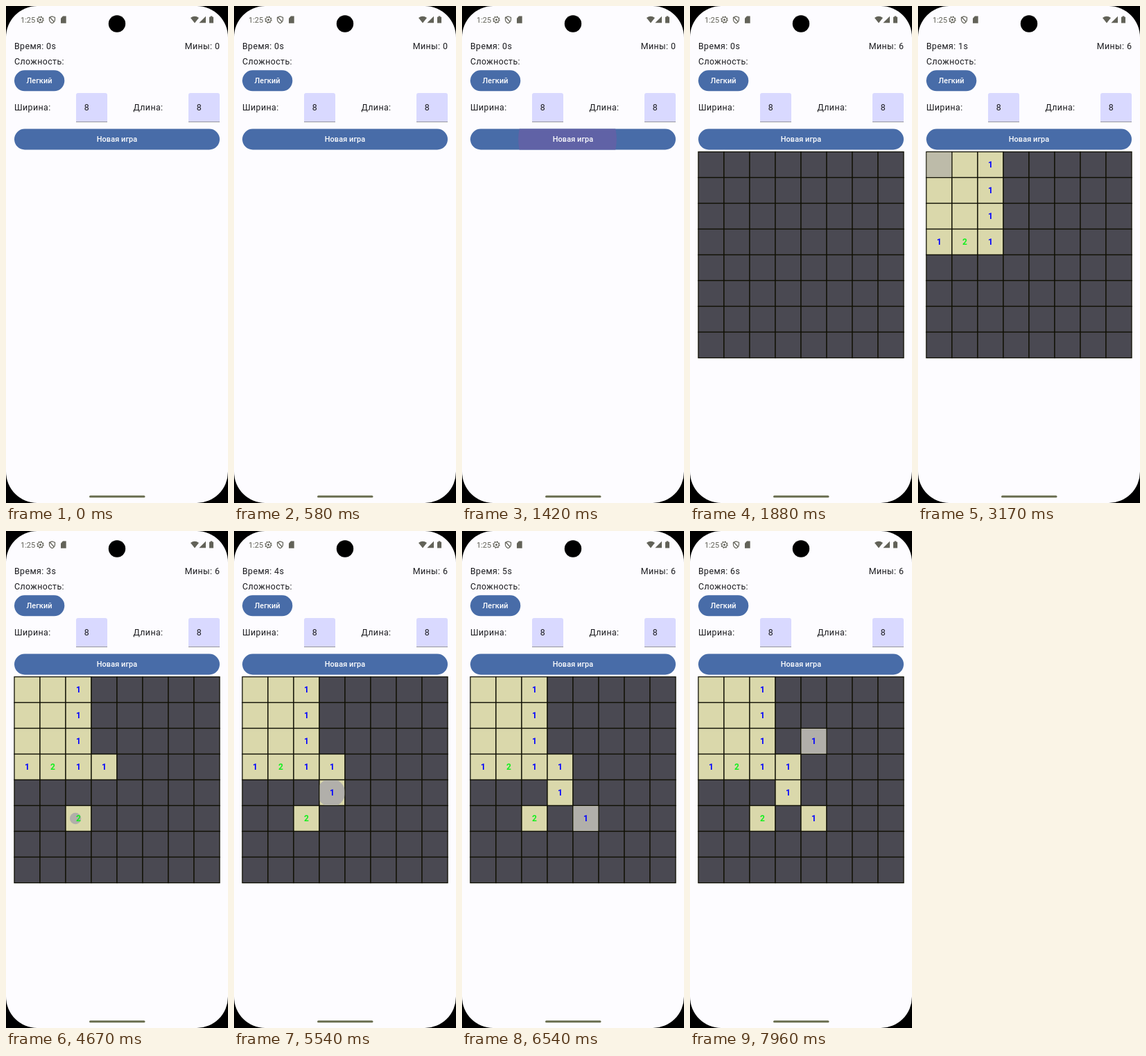
An HTML page for the animation above (8 s loop, 320 by 714 pixels).

```html
<!DOCTYPE html>
<html lang="ru">
<head>
<meta charset="utf-8">
<title>Игра</title>
<style>
  html, body { margin: 0; width: 100%; height: 100%; overflow: hidden; background: #000; }
  svg { display: block; width: 100%; height: 100%; font-family: Roboto, sans-serif; }
  .body { font-size: 12.4px; letter-spacing: .39px; fill: #1b1b1f; }
  .button { fill: #486ca8; }
  .label { font-size: 10.9px; font-weight: 500; letter-spacing: .08px; fill: #fff; text-anchor: middle; }
  .number { font-size: 12px; font-weight: 700; text-anchor: middle; }
  .status { fill: #626258; }
  .line { fill: none; stroke: #626258; stroke-width: 1.2; }
</style>
</head>
<body>
<svg viewBox="0 0 320 714">
  <defs>
    <clipPath id="buttonClip"><rect x="12" y="176.5" width="296" height="30" rx="15"/></clipPath>
    <clipPath id="cellClip"><rect id="cellClipRect" width="35.7" height="35.7"/></clipPath>
  </defs>
  <rect width="320" height="714" rx="45" fill="#fdfcff"/>
  <circle cx="160" cy="25.5" r="12.2"/>

  <text class="status" x="21" y="23.5" font-size="11">1:25</text>
  <circle class="line" cx="49.5" cy="19.7" r="3.7"/>
  <circle class="line" cx="49.5" cy="19.7" r="4.6" stroke-dasharray="1.8 1.81"/>
  <circle class="status" cx="49.5" cy="19.7" r="1.5"/>
  <path class="line" d="M66.5 15l4 1.5v3c0 2.400-1.700 4.200-4 5.200-2.300-1-4-2.800-4-5.200v-3zM63.500 16.500l6 6.500"/>
  <path class="status" d="M82 14.500h4.700v10.200H79v-7z"/>
  <path class="status" d="M266 17q6-4.500 12 0l-6 7.500zM288 14.700v9.600h-9.600zM293 15.700h1.600v-1.200h2.800v1.200H299v8.800h-6z"/>

  <text class="body" x="12" y="62.300" id="clock">Время: 0s</text>
  <text class="body" x="308.300" y="62.300" text-anchor="end" id="mines">Мины: 0</text>
  <text class="body" x="12" y="84.300">Сложность:</text>
  <rect class="button" x="12" y="92.300" width="72.300" height="30" rx="15"/>
  <text class="label" x="48" y="111.200">Легкий</text>

  <text class="body" x="12" y="150.300">Ширина:</text>
  <text class="body" x="183.500" y="150.300">Длина:</text>
  <g id="fields"></g>

  <rect class="button" x="12" y="176.500" width="296" height="30" rx="15"/>
  <g clip-path="url(#buttonClip)"><circle id="buttonRipple" cx="152" cy="191.500" fill="#6062a6"/></g>
  <text class="label" x="160" y="195.300">Новая игра</text>

  <g id="board"></g>
  <rect x="120" y="703.300" width="80.500" height="3" rx="1.500" fill="#6a6e50"/>
</svg>
<script>
const LOOP = 8000, SIZE = 37, LEFT = 12, TOP = 209.5;
const START = 1460, HOLD = 500, FADE = 300;
const TAPS = [
  { at: 2580, col: 0, row: 0 },
  { at: 3620, col: 3, row: 3, value: 1 },
  { at: 4620, col: 2, row: 5, value: 2 },
  { at: 5360, col: 3, row: 4, value: 1 },
  { at: 6100, col: 4, row: 5, value: 1 },
  { at: 7540, col: 4, row: 2, value: 1 }
];
const OPENING = ['  1', '  1', '  1', '121'];

const $ = id => document.getElementById(id);
const clamp = v => Math.min(1, Math.max(0, v));

function add(parent, tag, attrs, text = '') {
  const node = document.createElementNS('http://www.w3.org/2000/svg', tag);
  for (const key in attrs) node.setAttribute(key, attrs[key]);
  node.textContent = text;
  return parent.appendChild(node);
}

for (const x of [101, 263]) {
  add($('fields'), 'path', { d: `M${x} 167v-39q0-3 3-3h39q3 0 3 3v39z`, fill: '#d9d9ff' });
  add($('fields'), 'rect', { x, y: 166, width: 45, height: 1, fill: '#98989c' });
  add($('fields'), 'text', { class: 'body', x: x + 11.7, y: 150.3 }, '8');
}

const board = $('board');
const tiles = [];
for (let i = 0; i < 64; i++) {
  const col = i % 8, row = i >> 3;
  const tap = TAPS.find(p => p.col === col && p.row === row);
  const opened = row < 4 && col < 3;
  tiles.push({
    openAt: opened ? TAPS[0].at : tap ? tap.at : Infinity,
    value: opened ? OPENING[row][col].trim() : tap && tap.value,
    x: LEFT + col * SIZE,
    y: TOP + row * SIZE
  });
}
for (const tile of tiles) {
  tile.rect = add(board, 'rect', { x: tile.x, y: tile.y, width: SIZE, height: SIZE, stroke: '#101004', 'stroke-width': 1.3 });
}
const ripple = add(add(board, 'g', { 'clip-path': 'url(#cellClip)' }), 'circle', { fill: '#b1afaa' });
for (const tile of tiles) {
  if (!tile.value) continue;
  tile.label = add(board, 'text', {
    class: 'number', x: tile.x + SIZE / 2, y: tile.y + 22.7,
    fill: tile.value == 1 ? '#0000ff' : '#14f01e'
  }, tile.value);
}

function drawRipple(node, age, enter, hold, fade, from, to) {
  node.setAttribute('r', age < 0 ? 0 : from + (to - from) * clamp(age / enter));
  node.setAttribute('opacity', 1 - clamp((age - hold) / fade));
}

function render(t) {
  const started = t >= START;
  $('clock').textContent = `Время: ${Math.max(0, Math.floor((t - START) / 1000))}s`;
  $('mines').textContent = `Мины: ${started ? 6 : 0}`;
  drawRipple($('buttonRipple'), t - 1300, 330, 330, 170, 10, 176);

  board.setAttribute('visibility', started ? 'visible' : 'hidden');
  for (const tile of tiles) {
    const open = t >= tile.openAt;
    tile.rect.setAttribute('fill', open ? '#dad8ab' : '#4a4952');
    if (tile.label) tile.label.setAttribute('opacity', open ? 1 : 0);
  }

  const tap = TAPS.filter(p => p.at <= t).pop() || TAPS[0];
  const x = LEFT + tap.col * SIZE, y = TOP + tap.row * SIZE;
  const age = t - tap.at;
  $('cellClipRect').setAttribute('x', x + .65);
  $('cellClipRect').setAttribute('y', y + .65);
  ripple.setAttribute('cx', x + SIZE / 2 - 5.5 * (1 - clamp(age / 250)));
  ripple.setAttribute('cy', y + SIZE / 2);
  drawRipple(ripple, age, 250, HOLD, FADE, 3.5, 26.5);
}

const origin = performance.now();
function frame() {
  render((performance.now() - origin) % LOOP);
  requestAnimationFrame(frame);
}
frame();
</script>
</body>
</html>
```
